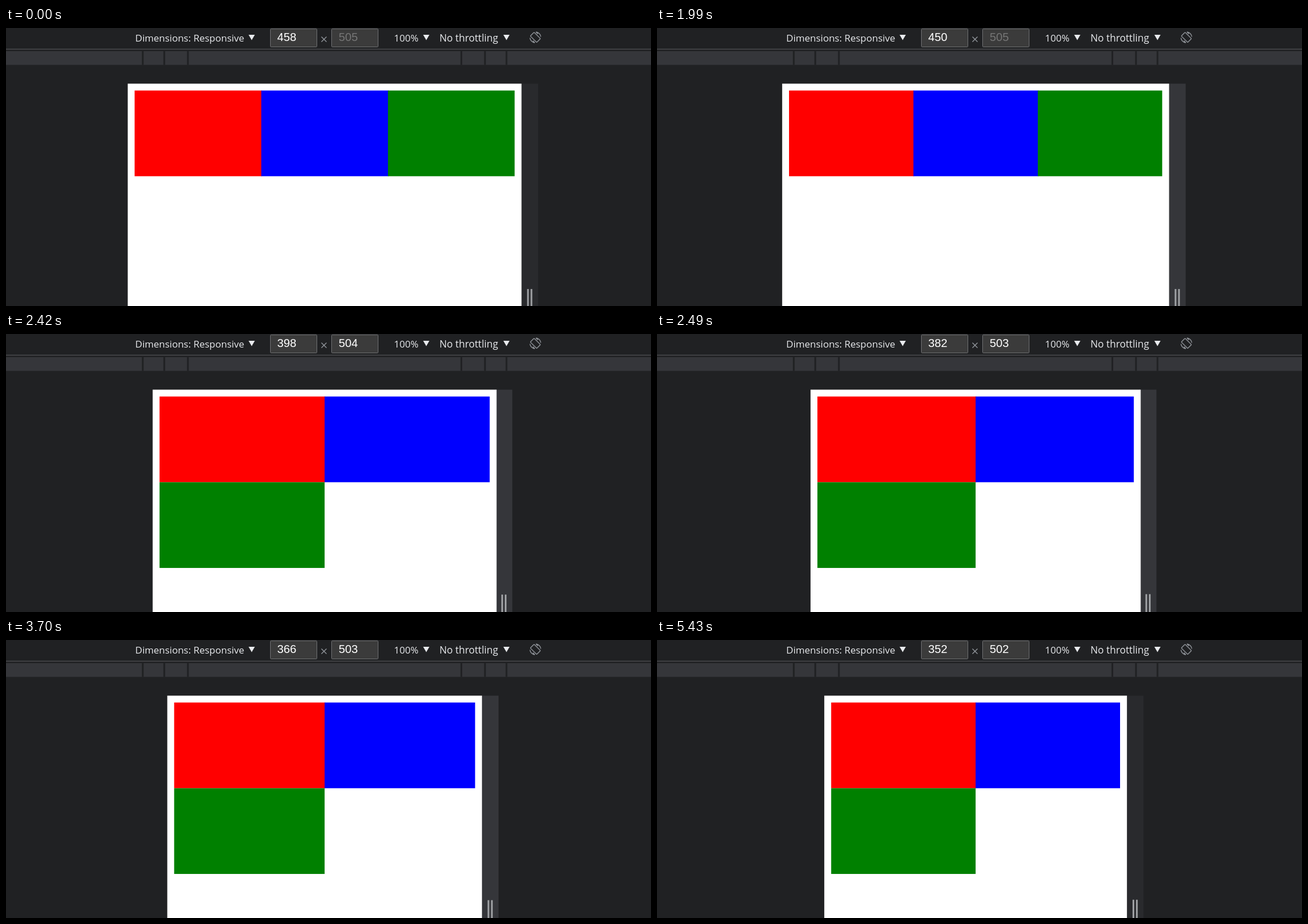
These frames come from a looping animation (1138 by 492 pixels, 6.31 s). An HTML page:

```html
<!DOCTYPE html>
<html lang="en">
<head>
<meta charset="utf-8">
<title>Responsive resize</title>
<style>
  html, body { margin: 0; width: 100%; height: 100%; overflow: hidden; background: #202123; }
  svg { display: block; width: 100%; height: 100%; }
  .label { font: 17px "Open Sans", "Noto Sans", sans-serif; fill: #e8eaed; }
  .size { font: 20.3px "Liberation Sans", Arial, sans-serif; fill: #fff; }
  .field { fill: #3b3b3b; stroke: #717274; }
  .icon { fill: none; stroke: #94989e; stroke-width: 1.4; }
</style>
</head>
<body>
<svg viewBox="0 0 1138 492">
  <rect y="36.7" width="1138" height="1.5" fill="#4b4c4f"/>
  <rect y="41" width="1138" height="24.3" fill="#35363a"/>
  <g id="ticks" fill="#202123"></g>

  <text class="label" x="228" y="24">Dimensions: Responsive</text>
  <text class="label" x="684.5" y="24">100%</text>
  <text class="label" x="764.7" y="24" style="font-size:17.4px">No throttling</text>
  <g id="arrows" fill="#e8eaed"></g>

  <rect class="field" x="466.5" y="1.5" width="82" height="32" rx="1"/>
  <rect class="field" x="574.5" y="1.5" width="82" height="32" rx="1"/>
  <text class="size" id="widthText" x="478.4" y="23"></text>
  <text class="size" id="heightText" x="587" y="23"></text>
  <path class="icon" d="M556.5 15.5l9 9m0-9l-9 9"/>

  <g class="icon" transform="translate(934 16.5)">
    <rect x="-8" y="-4.7" width="16" height="9.4" rx="1" transform="rotate(45)"/>
    <path id="arc" d="M1 -9.5A9.6 9.6 0 0 1 9.6 -1M1 -9.5l3.5 3.5"/>
    <use href="#arc" transform="rotate(180)"/>
  </g>

  <rect id="grip" height="394"/>
  <g id="handle" fill="#9fa1a4">
    <rect x="-4.6" width="3" height="40"/>
    <rect x="1.5" width="3" height="40"/>
  </g>
  <rect id="page" height="394" fill="#fff"/>
  <g id="blocks"></g>
</svg>
<script>
const LOOP = 6310, SCALE = 1.517, CENTER = 562.15, TOP = 98.5;
const FULL = 458, FULL_HEIGHT = 505, LEAST = 352;
const PAD = 8 * SCALE, TALL = 100 * SCALE;

// Each pull of the handle starts where the last one ended.
const PULLS = [
  { at: 1850, until: 1990, steps: 3, to: 450 },
  { at: 2210, until: 2630, steps: 7, to: 374 },
  { at: 3100, until: 3100, steps: 1, to: 372 },
  { at: 3560, until: 3900, steps: 5, to: 356 },
  { at: 4100, until: 4170, steps: 2, to: LEAST }
];
const RELEASE = 5230;

const $ = id => document.getElementById(id);
function set(node, attrs) {
  for (const key in attrs) node.setAttribute(key, attrs[key]);
  return node;
}
function add(parent, tag, attrs) {
  return parent.appendChild(set(document.createElementNS('http://www.w3.org/2000/svg', tag), attrs));
}

for (const device of [320, 375, 425]) {
  const offset = device * SCALE / 2;
  for (const x of [CENTER - offset, CENTER + offset - 3])
    add($('ticks'), 'rect', { x, y: 41, width: 3, height: 24.3 });
}
for (const x of [428, 736, 877.5]) add($('arrows'), 'path', { d: `M${x} 12h11l-5.5 9.5z` });
const blocks = ['#f00', '#00f', '#008000'].map(fill => add($('blocks'), 'rect', { fill }));

const ease = p => 1 - (1 - p ** 2.1) ** 3.2;

function widthAt(time) {
  let width = FULL;
  for (const { at, until, steps, to } of PULLS) {
    if (time < at) break;
    const gap = (until - at) / (steps - 1) || 1;
    const progress = Math.min(1, (Math.floor((time - at) / gap) + 1) / steps);
    width += (to - width) * ease(progress);
  }
  return 2 * Math.round(width / 2);
}

function heightAt(width) {
  const shrink = (FULL - width) / (FULL - LEAST);
  return Math.round(FULL_HEIGHT - 3 * shrink ** 1.5);
}

function layOut(width) {
  const wide = width * SCALE, left = CENTER - wide / 2;
  const columns = width > 400 ? 3 : 2;
  const cell = (wide - 2 * PAD) / columns;
  set($('page'), { x: left, y: TOP, width: wide });
  blocks.forEach((block, i) => {
    const overlap = i < columns - 1 ? 1 : 0; // hides the seam under the next block
    set(block, {
      x: left + PAD + i % columns * cell,
      y: TOP + PAD + Math.floor(i / columns) * TALL,
      width: cell + overlap,
      height: TALL
    });
  });
}

function draw(time) {
  const width = widthAt(time), height = heightAt(width);
  const lag = widthAt(time - 70) - width >= 10 ? 2 : 0; // the page trails a quick pull
  const edge = CENTER + width * SCALE / 2;
  const dragging = time >= PULLS[0].at && time < RELEASE;
  layOut(width + lag);
  set($('grip'), { x: edge - 1, y: TOP, width: 30.3, fill: dragging ? '#35363a' : '#292a2d' });
  set($('handle'), { transform: `translate(${edge + 14.5} ${TOP + height * SCALE / 2 - 19.6})` });
  $('widthText').textContent = width;
  $('heightText').textContent = height;
  $('heightText').style.fill = height === FULL_HEIGHT ? '#757575' : '#fff';
}

const start = performance.now();
function tick() {
  draw((performance.now() - start) % LOOP);
  requestAnimationFrame(tick);
}
tick();
</script>
</body>
</html>
```
